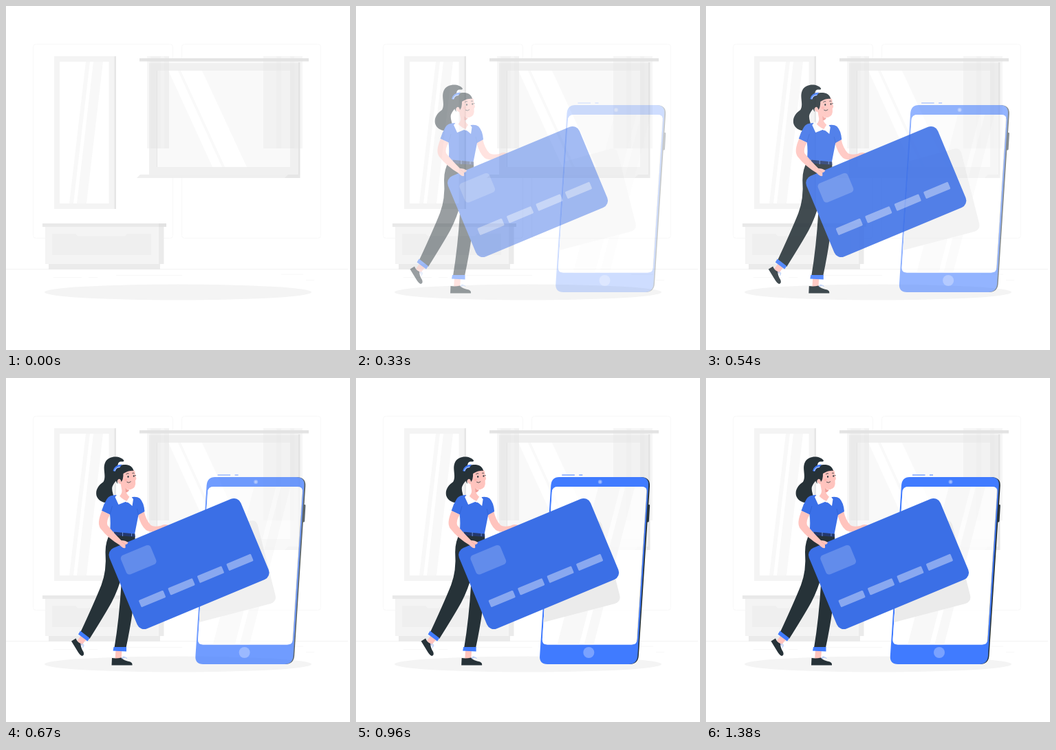
These frames come from a looping animation (500 px wide and 500 px high, 1430 ms). An HTML page:

```html
<!DOCTYPE html>
<html lang="en">
<head>
<meta charset="utf-8">
<title>Card payment</title>
<style>
  html, body { margin: 0; width: 100%; height: 100%; overflow: hidden; background: #fff; }
  svg { display: block; width: 100vw; height: 100vh; }
</style>
</head>
<body>
<svg viewBox="0 0 500 500">
  <defs>
    <clipPath id="screen">
      <path d="M294 158H416Q424 158 423.500 166L409.500 380Q409 387.500 401 387.500H279Q271 387.500 271.500 380L285.500 166Q286 158 294 158Z"/>
    </clipPath>
  </defs>

  <g id="room">
    <g fill="none" stroke="#f8f8f8">
      <rect x="39.500" y="55.500" width="203" height="282" rx="4"/>
      <rect x="255.500" y="55.500" width="202" height="282" rx="4"/>
      <path d="M0 382.500H497" stroke="#f3f3f3"/>
      <path d="M69 394.500H110M120 394.500H133M160 391.500H256M400 390H432M436 398.500H448"/>
    </g>

    <!-- mirror -->
    <path d="M70 73H158V295H70Z" fill="#f4f4f4"/>
    <path d="M157.500 73H160V295H157.500Z" fill="#e6e6e6"/>
    <path d="M78 81H149.500V287H78Z" fill="#fff"/>
    <path d="M116 81H122L98 287H92ZM127 81H141L117 287H103Z" fill="#f8f8f8"/>

    <!-- window -->
    <path d="M208 80H427V250H208Z" fill="#f0f0f0"/>
    <path d="M208 80H427V83H208Z" fill="#fafafa"/>
    <path d="M425 82H427.500V250H425Z" fill="#e4e4e4"/>
    <path d="M195 245H427V250H190Z" fill="#efefef"/>
    <path d="M410 245H427V250H405Z" fill="#e6e6e6"/>
    <path d="M220 94H413V234H220Z" fill="#f9f9f9"/>
    <path d="M236 94H250L314 234H300ZM254 94H285L350 234H318Z" fill="#fff"/>
    <path d="M219.500 94V234" stroke="#e6e6e6"/>
    <path d="M194 76H440V80.500H194Z" fill="#e4e4e4"/>
    <g fill="#e0e0e0">
      <path d="M205 73H237V207H205ZM374 73H431V207H374Z" opacity=".3"/>
      <path d="M210 73H225V207H210ZM230 73H237V207H230ZM393 73H400V207H393ZM413 73H419V207H413Z" opacity=".2"/>
    </g>

    <!-- cabinet -->
    <path d="M57 321H222V375H57Z" fill="#f4f4f4"/>
    <path d="M222 321H229.500V375H222Z" fill="#ebebeb"/>
    <path d="M53 316H233V321H53Z" fill="#e9e9e9"/>
    <path d="M222 316H233V321H222Z" fill="#e2e2e2"/>
    <path d="M67 331H101L104 334.500H173L176 331H211V362H67Z" fill="#efefef"/>
    <path d="M62 375H224V383H62Z" fill="#ebebeb"/>
    <ellipse cx="250" cy="416" rx="194" ry="11.500" fill="#f4f4f4"/>
  </g>

  <g id="phone">
    <path d="M414 144Q428.500 144 427.700 157L411.500 404Q410.500 416 398 416L395 410L408 392L423 160Z" fill="#263238"/>
    <path d="M424.500 184H427Q428 184 427.800 186L426.500 208Q426.400 209.500 425 209.500H423Z" fill="#263238"/>
    <path fill="#407bff" fill-rule="evenodd" d="M296 144H414Q426.500 144 425.800 156L410 404Q409 416 397 416H279Q267 416 267.800 404L284 156Q285 144 296 144ZM294 158Q286 158 285.500 166L271.500 380Q271 387.500 279 387.500H401Q409 387.500 409.500 380L423.500 166Q424 158 416 158Z"/>
    <g clip-path="url(#screen)">
      <path d="M260 150H430V390H260Z" fill="#fff" opacity=".78"/>
      <path d="M293 388L353 158H385L325 388ZM332 388L392 158H406L346 388Z" fill="#f0f0f0" opacity=".45"/>
      <path d="M270 229L346 208Q355 205 358 213L384 316Q386 325 377 328L262 358Z" fill="#ebebeb"/>
    </g>
    <g fill="#7aa2ff">
      <circle cx="339" cy="399" r="8"/>
      <circle cx="355.500" cy="151" r="3"/>
      <path d="M300 140.200H318.500V141.800H300ZM325 140.200H330V141.800H325Z"/>
    </g>
    <circle cx="355.500" cy="151" r="1.500" fill="#a6c1ff"/>
  </g>

  <g id="buyer">
    <!-- feet -->
    <g fill="#ffc4be">
      <path d="M110 372L117 379L109 389L103 382Z"/>
      <path d="M159 395H168L167 410H158Z"/>
    </g>
    <g fill="#263238">
      <path d="M94.500 382.500L101 378.500Q103 384 108 386Q108 392 112 398Q114 403 110 404Q107 403 104 398Z"/>
      <path d="M153.500 407Q160 408 167 406.500Q171 411 180 412.500Q183.500 414 183 417.500H153Z"/>
    </g>
    <path d="M108 387q6-1 4 3m-4-3q5 2 3 5M168 408q2-5 4-2m-4 2q6-4 7 0" fill="none" stroke="#a9c3f5"/>

    <!-- trousers -->
    <g fill="#263238">
      <path d="M151 226L187 229Q188 260 187 300Q186 335 174 392H157Q164 350 167 300L169 284Q163 307 153 326Q143 344 121 379L108 369Q128 326 138 301Q146 280 144 253Q144 237 151 226Z"/>
    </g>
    <path d="M107.500 367.500L121 378L118 382.500L104.500 372.500ZM156 391H174.500V397.500L155 396.500Z" fill="#407bff"/>

    <!-- far arm -->
    <path d="M191 198L200 193Q203 207 210 214Q214 217 224 215Q231 211 238 215Q236 220 228 222Q212 226 203 221Q195 214 191 198Z" fill="#ffc4be"/>

    <!-- hair behind the head -->
    <path d="M162 127C163 118 170 124 171 120C166 113 150 112 144 122C139 132 146 142 141 151C135 155 129 162 131 171C134 181 147 184 154 178C159 173 152 166 154 158C157 151 162 148 164 140Z" fill="#263238"/>

    <!-- head -->
    <g fill="#ffc4be">
      <path d="M166 153L176 158L174 166Q177 172 181 174L174 182L161 174Q168 170 168 164Z"/>
      <path d="M166 137Q180 126 187 136Q187 141 189 146.500L187.500 149Q189 160 181 162Q171 163 167 154Q162 154 161 149Q162 144 167 146Z"/>
    </g>
    <path d="M173 160Q175 163 179 162.500Q176 167 173.500 166Z" fill="#f2a29c"/>
    <path d="M158 143C155 130 165 125 174 126C182 127 184 131 185 135C178 134 172 138 170 139Q170 148 167 151Q166 146 163 147Q160 149 162 154Q158 150 158 143Z" fill="#263238"/>
    <path d="M155 135Q157 126 168 125.500L165 130Q160 130 158 136Z" fill="#407bff"/>
    <path d="M157.500 135Q159 129.500 165 129.500" fill="none" stroke="#d6e2ff"/>
    <g fill="#263238">
      <ellipse cx="177" cy="143.500" rx="1" ry="1.400"/>
      <ellipse cx="185.200" cy="142.500" rx=".9" ry="1.300"/>
    </g>
    <path d="M174 140q2-2 4-1M183 138.500q2-1 3 0M175 151q3 2.500 6-.5M186.500 142l2-.5" fill="none" stroke="#263238" stroke-width=".8"/>
    <circle cx="173.500" cy="148" r="2" fill="#ffaaa5" opacity=".6"/>

    <!-- shirt -->
    <path d="M160 170Q149 170 146 176Q141 184 138.500 193L150.500 198.500Q152 210 150.500 224L186.500 227L192 199L201 194Q200 181 194 175Q190 172 183 173L175 181Z" fill="#3b70e8"/>
    <path d="M150.500 198L154 186M192 199L190 190" fill="none" stroke="#2d5fd0" stroke-width=".7"/>
    <path d="M162 168L158 173L163 184L173 180Q176 179 183 186L184.500 176L180 171L175 179Q166 175 162 168Z" fill="#fff"/>
    <path d="M150 223L187 226.500V231L150 228Z" fill="#24396d"/>
    <path d="M156 223v5M169 224v6M182 226v4" stroke="#6f93d8"/>

    <!-- card -->
    <g transform="translate(265.500 270) rotate(-22.600)">
      <rect x="-103.500" y="-63.500" width="207" height="127" rx="11" fill="#3b6fe6"/>
      <rect x="-89" y="-48.500" width="47" height="30" rx="5" fill="#fff" opacity=".2"/>
      <g id="slots" fill="#fff" opacity=".4"></g>
    </g>

    <!-- near arm -->
    <path d="M139 193L150.500 198.500Q145 208 147 214Q155 224 167 236Q173 236 177 239Q176 242 173 242L173 247Q169 248 165 243Q148 233 137 219Q131 211 139 193Z" fill="#ffc4be"/>
    <path d="M167 237Q170 240 173 242" fill="none" stroke="#f2a29c" stroke-width=".7"/>
  </g>
</svg>
<script>
  const LOOP = 1430, FPS = 24, LAST = 33, LEAD = 35, SHIFT = 30;
  const el = id => document.getElementById(id);
  const phone = el('phone'), buyer = el('buyer');

  for (let i = 0; i < 4; i++) {
    const r = document.createElementNS('http://www.w3.org/2000/svg', 'rect');
    const box = { x: -88.2 + i * 46, y: 21, width: 38.5, height: 11, rx: 1.5 };
    for (const k in box) r.setAttribute(k, box[k]);
    el('slots').append(r);
  }

  const bez = (s, a, b) => 3 * (1 - s) ** 2 * s * a + 3 * (1 - s) * s * s * b + s ** 3;

  // Cubic ease with a slight overshoot
  function ease(x) {
    if (x >= 1) return 1;
    let lo = 0, hi = 1;
    for (let i = 0; i < 24; i++) {
      const mid = (lo + hi) / 2;
      if (bez(mid, .36, .5) < x) lo = mid; else hi = mid;
    }
    return bez(lo, -.01, 1.38);
  }

  function slide(node, p, from) {
    node.setAttribute('transform', `translate(${(from * (1 - p)).toFixed(3)} 0)`);
    node.setAttribute('opacity', Math.max(0, Math.min(1, p)).toFixed(4));
  }

  function draw(t) {
    const step = Math.min(LAST, Math.floor((t + 5) * FPS / 1000 + 1e-6));
    const ms = step < 2 ? 0 : step * 1000 / FPS + LEAD;
    slide(buyer, ease(ms / 1000), -SHIFT);
    slide(phone, ease(ms / 1400), SHIFT);
  }

  let start;
  function tick(now) {
    start ??= now;
    draw((now - start) % LOOP);
    requestAnimationFrame(tick);
  }
  draw(0);
  requestAnimationFrame(tick);
</script>
</body>
</html>
```
